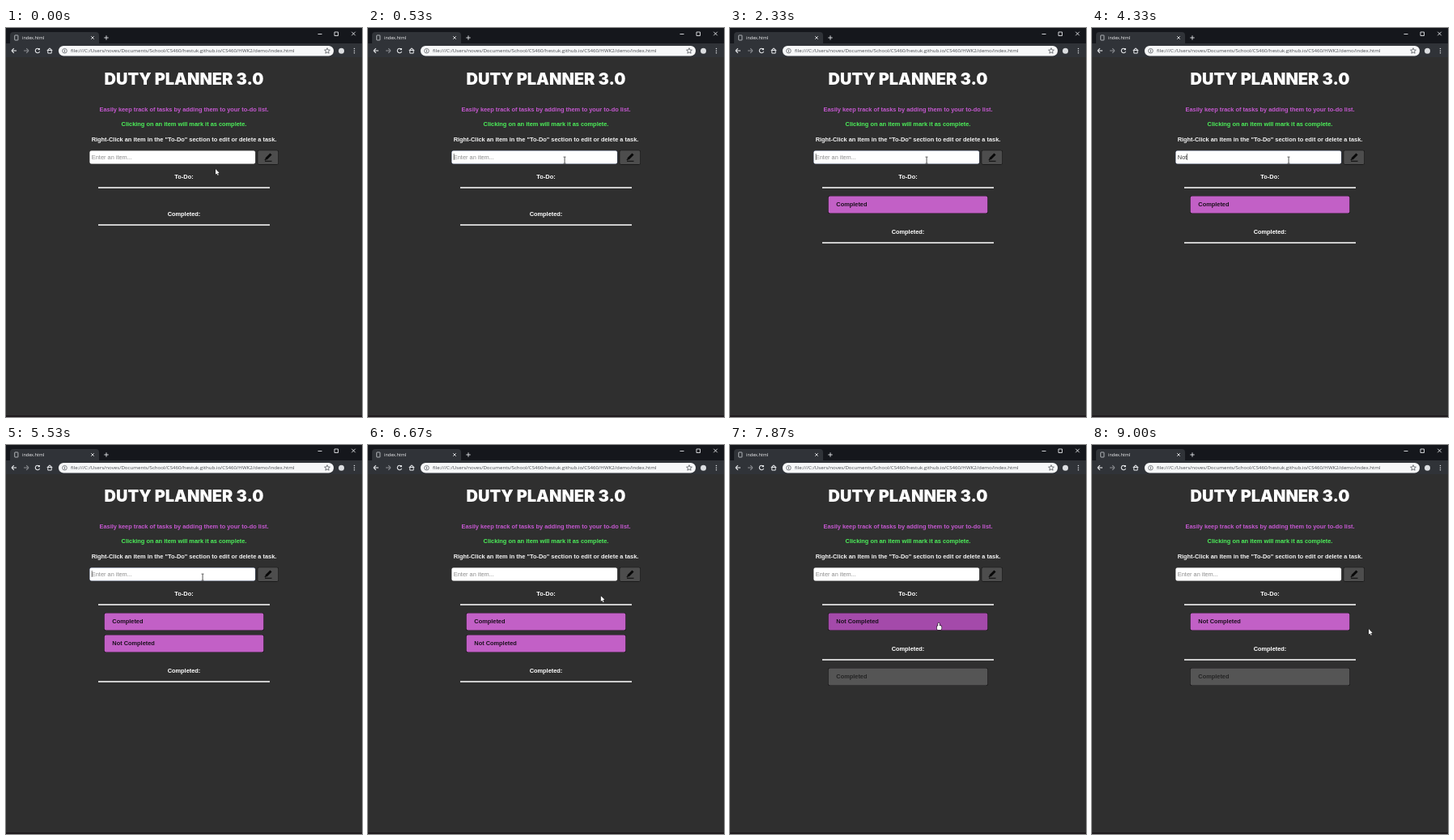
Recreate the animation shown at these times as an HTML page with a canvas. Size 440 by 480 pixels, loop 9.47 s.

```html
<!DOCTYPE html>
<html lang="en">
<head>
<meta charset="utf-8">
<title>To-do list</title>
<style>
html, body { margin: 0; width: 100%; height: 100%; overflow: hidden; background: #2f2f2f; }
canvas { display: block; width: 440px; height: 480px; }
</style>
</head>
<body>
<canvas id="stage" width="440" height="480"></canvas>
<script>
const ctx = document.getElementById('stage').getContext('2d');
const LOOP = 9470;
const SANS = '"Liberation Sans", Arial, sans-serif';
const UI = '"Open Sans", "Noto Sans", sans-serif';
const BODY = `7.4px ${SANS}`;
const BOLD = `bold ${BODY}`;
const ICON = '#e4e6e9';
const MID = 220, PITCH = 27, LIST_TOP = 207;

const FOCUS = 470, ENTER_1 = 2270, ENTER_2 = 5400, BLUR = 6500, CLICK = 7600;
const BLINK = 535, FADE = 150;

// Typing runs: each key follows the last after a fixed step
const runs = [
  { text: 'Completed', from: 800, step: 159 },
  { text: 'No', from: 3330, step: 200 },
  { text: 't Completed', from: 4300, step: 95 }
];

const moves = [
  { from: 70, to: 430, x: 243, y: 162 },
  { from: 5950, to: 6350, x: 288, y: 186 },
  { from: 6650, to: 7150, x: 252, y: 219 },
  { from: 7800, to: 8250, x: 342, y: 227 }
];

const clamp = v => Math.max(0, Math.min(1, v));
const ease = v => v * v * (3 - 2 * v);

function mouseAt(t) {
  let x = 259, y = 174;
  for (const m of moves) {
    const k = ease(clamp((t - m.from) / (m.to - m.from)));
    x += (m.x - x) * k;
    y += (m.y - y) * k;
  }
  return { x, y };
}

function typingAt(t) {
  const since = [ENTER_2, ENTER_1, FOCUS].find(at => t >= at) ?? 0;
  let typed = '', last = since;
  for (const run of runs) {
    if (run.from < since || run.from > t) continue;
    const keys = Math.min(run.text.length, Math.floor((t - run.from) / run.step) + 1);
    typed += run.text.slice(0, keys);
    last = run.from + (keys - 1) * run.step;
  }
  return { typed, last };
}

function text(str, x, y, font, color, align = 'left') {
  ctx.font = font;
  ctx.fillStyle = color;
  ctx.textAlign = align;
  ctx.fillText(str, x, y);
}

function rect(x, y, w, h, color) {
  ctx.fillStyle = color;
  ctx.fillRect(x, y, w, h);
}

function paint(fill, stroke, width = 1) {
  if (stroke) { ctx.strokeStyle = stroke; ctx.lineWidth = width; ctx.stroke(); }
  if (fill) { ctx.fillStyle = fill; ctx.fill(); }
}

function box(x, y, w, h, r, ...style) {
  ctx.beginPath();
  ctx.roundRect(x, y, w, h, r);
  paint(...style);
}

function circle(x, y, r, ...style) {
  ctx.beginPath();
  ctx.arc(x, y, r, 0, Math.PI * 2);
  paint(...style);
}

function line(x1, y1, x2, y2, color, width = 1) {
  ctx.beginPath();
  ctx.moveTo(x1, y1);
  ctx.lineTo(x2, y2);
  paint(null, color, width);
}

function plus(x, y, r, angle, color) {
  for (const a of [angle, angle + Math.PI / 2]) {
    const dx = r * Math.cos(a), dy = r * Math.sin(a);
    line(x - dx, y - dy, x + dx, y + dy, color, 0.9);
  }
}

// Two strokes meeting at a point, opening towards the angle
function chevron(x, y, r, angle, color) {
  for (const side of [-1, 1]) {
    const a = angle + side * Math.PI / 4;
    line(x, y, x + r * Math.cos(a), y + r * Math.sin(a), color, 1.1);
  }
}

function star(x, y, r) {
  ctx.beginPath();
  for (let i = 0; i < 10; i++) {
    const d = i % 2 ? r * 0.45 : r, a = i * Math.PI / 5;
    ctx.lineTo(x + d * Math.sin(a), y - d * Math.cos(a));
  }
  ctx.closePath();
  paint(null, '#55585d', 0.8);
}

function toolbarIcons() {
  for (const [x, dir, color] of [[10, 1, ICON], [25, -1, '#85888d']]) {
    line(x - 3, 28, x + 3, 28, color, 1.1);
    chevron(x - 3 * dir, 28, 4, dir > 0 ? 0 : Math.PI, color);
  }
  ctx.beginPath();
  ctx.arc(39, 28, 2.7, 0.3, 5.4);
  paint(null, ICON, 1.1);
  rect(39.7, 25, 2.2, 2.2, ICON);
  chevron(54, 24.8, 4.6, Math.PI / 2, ICON);
  box(51.8, 27.5, 4.4, 3.6, 0, null, ICON);
  circle(414.5, 28.3, 3.5, '#dcdee1');
  for (let i = -1; i <= 1; i++) circle(430.5, 28.2 + i * 2.6, 0.75, ICON);
}

function browser() {
  rect(0, 0, 440, 19, '#15171c');
  box(5, 5, 110, 20, [4, 4, 0, 0], '#303338');
  rect(0, 19, 440, 17, '#303338');

  box(10.7, 9, 4.2, 6, 0.5, null, '#d0d3d7', 0.8);
  text('index.html', 20, 14, `5.5px ${UI}`, '#f0f1f3');
  plus(107, 12, 2.5, Math.PI / 4, ICON);
  plus(124, 12, 2.7, 0, ICON);
  line(385.5, 7.5, 390.5, 7.5, ICON, 0.9);
  box(406, 5, 4.5, 4.5, 0, null, ICON, 0.9);
  plus(429.5, 7, 3.2, Math.PI / 4, ICON);
  toolbarIcons();

  box(65, 22, 340, 12.5, 6.2, '#f7f8f9');
  circle(72.5, 28.2, 2.8, null, '#5f6368', 0.8);
  line(72.5, 26.6, 72.5, 30, '#5f6368', 0.8);
  text('file:///C:/Users/noves/Documents/School/CS460/hestuk.github.io/CS460/HWK2/demo/index.html',
    80, 30.3, `6.15px ${UI}`, '#484b50');
  star(397, 28.3, 3.6);
}

function pencilButton() {
  box(311.3, 151.3, 25, 16.7, 1.5, '#4d4d4d', '#151515', 1.3);
  line(321.5, 161.5, 327.5, 155.5, '#080808', 3);
  line(320, 163, 322, 161, '#080808', 1.5);
  line(320, 164.3, 328.5, 164.3, '#080808');
}

function inputField(t) {
  const focused = t >= FOCUS && t < BLUR;
  box(103.5, 151.5, 204.5, 16, 2, '#fff', focused ? '#34405c' : '#555');

  const { typed, last } = typingAt(t);
  text(typed || 'Enter an item...', 105.8, 161.7, BODY, typed ? '#333' : '#8c8c8c');
  if (focused && Math.floor((t - last) / BLINK) % 2 === 0) {
    const width = typed ? ctx.measureText(typed).width : 0;
    rect(105.8 + width, 155, 0.7, 8, '#444');
  }
}

function heading(label, y) {
  text(label, MID, y + 2.6, BOLD, '#fff', 'center');
  rect(114, y + 13.2, 212, 1.6, '#f4f4f4');
}

function item(label, y, fill, color = '#1a101c') {
  box(121.7, y + 0.6, 196.6, 20.8, 2, fill, '#181618', 1.3);
  text(label, 131.3, y + 13.3, BOLD, color);
}

const inside = (m, x, y, w, h) => m.x > x && m.x < x + w && m.y > y && m.y < y + h;
const overItem = (m, y) => inside(m, 121, y, 198, 22);
const rowTop = i => LIST_TOP + PITCH * i;

// The share of the last moments spent over a row gives a soft fade
function hoverFill(t, y) {
  const since = t >= CLICK ? CLICK : ENTER_1;
  const samples = 10;
  let k = 0;
  for (let i = 0; i < samples; i++) {
    const at = t - i * FADE / samples;
    if (at >= since && overItem(mouseAt(at), y)) k += 1 / samples;
  }
  return `rgb(${194 - 30 * k},${96 - 22 * k},${198 - 28 * k})`;
}

function lists(t) {
  const todo = [];
  if (t >= ENTER_1 && t < CLICK) todo.push('Completed');
  if (t >= ENTER_2) todo.push('Not Completed');

  heading('To-Do:', 183);
  todo.forEach((label, i) => item(label, rowTop(i), hoverFill(t, rowTop(i))));
  const y = todo.length ? rowTop(todo.length) + 17 : 229;
  heading('Completed:', y);
  if (t >= CLICK) item('Completed', y + 24, '#555', '#242424');
  return todo.length;
}

function beam(x, y) {
  rect(x - 0.4, y - 3.5, 0.9, 8, '#444');
  for (const dy of [-4, 4]) rect(x - 1.5, y + dy, 3, 0.8, '#444');
}

function hand(x, y) {
  for (const style of [[null, '#2a1a2c', 1.4], ['#fff']]) {
    box(x - 0.8, y, 1.6, 6, 0.8, ...style);
    box(x - 2.2, y + 3.5, 5.6, 5, 1.6, ...style);
  }
}

function arrow(x, y) {
  line(x + 1.5, y + 4, x + 3.2, y + 7.6, '#fff', 1.2);
  ctx.beginPath();
  ctx.moveTo(x, y);
  ctx.lineTo(x, y + 6.5);
  ctx.lineTo(x + 4.6, y + 4.7);
  ctx.closePath();
  paint('#fff', '#111', 0.8);
}

function cursor(t, rows) {
  const m = mouseAt(t);
  const onRow = Array.from({ length: rows }, (_, i) => rowTop(i)).some(y => overItem(m, y));
  if (inside(m, 103, 151, 205, 17)) beam(m.x, m.y + 0.7);
  else if (onRow) hand(m.x, m.y);
  else arrow(m.x, m.y);
}

function draw(t) {
  rect(0, 0, 440, 480, '#2f2f2f');
  browser();
  rect(0, 478, 440, 2, '#1f1a1d');
  text('DUTY PLANNER 3.0', MID, 69.7, '900 20px Inter, sans-serif', '#fff', 'center');
  text('Easily keep track of tasks by adding them to your to-do list.', MID, 102.8, BOLD, '#c558d0', 'center');
  text('Clicking on an item will mark it as complete.', MID, 121.4, BOLD, '#4cf05a', 'center');
  text('Right-Click an item in the "To-Do" section to edit or delete a task.', MID, 139.8, BOLD, '#f4f4f4', 'center');
  inputField(t);
  pencilButton();
  cursor(t, lists(t));
}

const begin = performance.now();
function tick() {
  draw((performance.now() - begin) % LOOP);
  requestAnimationFrame(tick);
}
tick();
</script>
</body>
</html>
```
